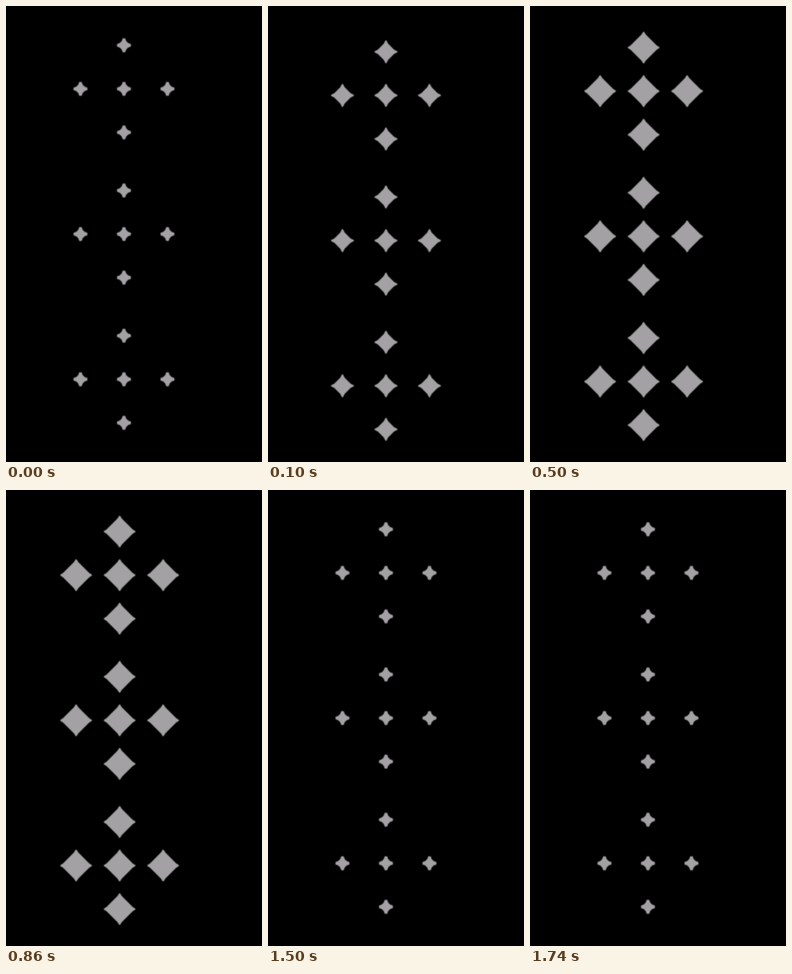
An HTML page that plays this animation: 561x998 px, repeating every 1900 ms.

```html
<!DOCTYPE html>
<html lang="en">
<head>
<meta charset="utf-8">
<title>Pulsing diamonds</title>
<style>
  html, body { margin: 0; width: 100%; height: 100%; overflow: hidden; background: #000; }
  svg { display: block; width: 100%; height: 100%; }
</style>
</head>
<body>
<svg viewBox="0 0 561 998">
  <defs>
    <filter id="soft" filterUnits="userSpaceOnUse" x="0" y="0" width="561" height="998" color-interpolation-filters="sRGB">
      <feGaussianBlur stdDeviation="1.1"/>
    </filter>
  </defs>
  <path id="stars" fill="#a4a1a4" filter="url(#soft)"/>
</svg>
<script>
const STEP = 95.33, GROUP = 317.8, LOOP = 1900;

// Corner points of one quadrant, from the vertical tip to the horizontal tip.
const SMALL = [[2.7, 15.2], [4.9, 9.2], [9.2, 4.9], [15.2, 2.7]];
const MEDIUM = [[1.1, 25], [4.8, 17.8], [17.8, 4.8], [25, 1.1]];
const LARGE = [[1, 34.6], [4.8, 28.6], [28.6, 4.8], [34.6, 1]];

const POSES = [
  { until: 100, x: 258.5, y: 86, shape: SMALL },
  { until: 500, x: 258.5, y: 100.3, shape: MEDIUM },
  { until: 1100, x: 249, y: 91, shape: LARGE },
  { until: 1500, x: 249, y: 100.3, shape: MEDIUM },
  { until: LOOP, x: 258.5, y: 86, shape: SMALL }
];

const CROSS = [[0, 0], [-1, 1], [0, 1], [1, 1], [0, 2]];
const stars = document.getElementById('stars');

function star(cx, cy, quadrant) {
  const points = [];
  let turn = quadrant;
  for (let i = 0; i < 4; i++) {
    for (const [x, y] of turn) points.push((cx + x).toFixed(2) + ' ' + (cy - y).toFixed(2));
    turn = turn.map(([x, y]) => [y, -x]);
  }
  return 'M' + points.join('L') + 'Z';
}

function outline({ x, y, shape }) {
  let d = '';
  for (let g = 0; g < 3; g++) {
    for (const [col, row] of CROSS) d += star(x + col * STEP, y + g * GROUP + row * STEP, shape);
  }
  return d;
}

for (const pose of POSES) pose.d = outline(pose);

let shown = null;
function draw(time) {
  const t = time % LOOP;
  const pose = POSES.find(p => t < p.until);
  if (pose !== shown) stars.setAttribute('d', pose.d);
  shown = pose;
}

const start = performance.now();
function tick() {
  draw(performance.now() - start);
  requestAnimationFrame(tick);
}
tick();
</script>
</body>
</html>
```
